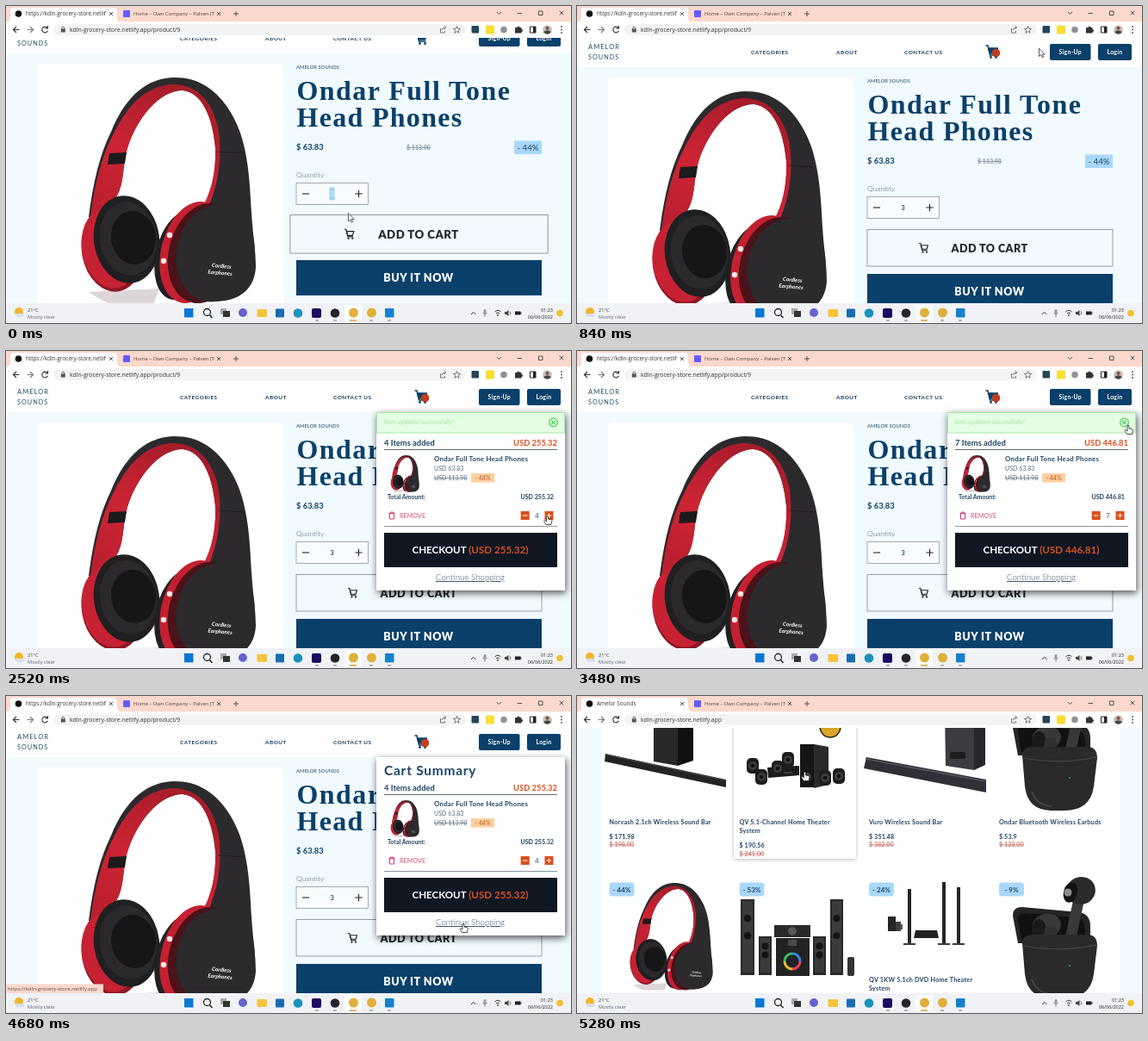
These frames come from a looping animation (656 by 368 pixels, 5.4 s). An HTML page:

```html
<!DOCTYPE html>
<html lang="en">
<head>
<meta charset="utf-8">
<title>Shop demo</title>
<style>
html,body{margin:0;width:100%;height:100%;overflow:hidden;background:#fff}
svg{display:block;width:100vw;height:100vh}
text{font-family:Lato,sans-serif;white-space:pre}
.ui text{font-family:"Open Sans","Noto Sans",sans-serif}
.serif{font-family:"Liberation Serif",serif;font-weight:700}
.shadow{filter:drop-shadow(1px 3px 4px #000a)}
.soft{filter:drop-shadow(0 1px 2px #0004)}
</style>
</head>
<body>
<svg id="stage" viewBox="0 0 656 368" preserveAspectRatio="none"></svg>
<script>
const STEP = 120, LOOP = 5400, UNIT = 63.83;
const NAVY = '#0a406a', INK = '#1f4566', PALE = '#f1faff', ORANGE = '#d9501e';

const text = (x, y, s, size, fill = INK, more = '') =>
  `<text x="${x}" y="${y}" font-size="${size}" fill="${fill}" ${more}>${s}</text>`;
const rect = (x, y, w, h, fill, more = '') =>
  `<rect x="${x}" y="${y}" width="${w}" height="${h}" fill="${fill}" ${more}/>`;
const circle = (x, y, r, fill, more = '') =>
  `<circle cx="${x}" cy="${y}" r="${r}" fill="${fill}" ${more}/>`;
const oval = (x, y, rx, ry, fill, turn = 0) =>
  `<ellipse cx="${x}" cy="${y}" rx="${rx}" ry="${ry}" fill="${fill}" transform="rotate(${turn} ${x} ${y})"/>`;
const shape = (d, fill, more = '') => `<path d="${d}" fill="${fill}" ${more}/>`;
const line = (d, color = '#444', w = 1) =>
  `<path d="${d}" fill="none" stroke="${color}" stroke-width="${w}"/>`;
const group = (id, body) => `<g id="${id}">${body}</g>`;
const bold = 'font-weight="700" ', heavy = 'font-weight="900" ', light = 'font-weight="300" ';
const middle = 'text-anchor="middle" ', right = 'text-anchor="end" ';
const spaced = n => `letter-spacing="${n}" `;
const strike = 'text-decoration="line-through"';
const cross = (x, y, r) => `M${x - r} ${y - r}l${2 * r} ${2 * r}m0 ${-2 * r}l${-2 * r} ${2 * r}`;
const plus = (x, y, r) => `M${x - r} ${y}h${2 * r}M${x} ${y - r}v${2 * r}`;
const trolley = (x, y, s, color, fill) =>
  `<g transform="translate(${x} ${y}) scale(${s})">` +
  shape('M3 3H14L12 9H5Z', fill, `stroke="${color}" stroke-width="1.5" stroke-linejoin="round"`) +
  line('M0 0H2.5L5 11H13', color, 1.5) + circle(6, 13.5, 1.4, color) + circle(12, 13.5, 1.4, color) + '</g>';

const headphones = () =>
  shape('M95 332L178 328L172 345H118Z', '#ddd6d8') +
  // band: dark shell, then the red lining along its inside
  shape('M96 245C101 205 109 172 122 146C140 102 166 83 196 83C230 83 252 104 267 135C281 165 283 202 285 240C287 270 290 284 290 303C289 325 275 342 245 343L214 330L230 232C240 212 244 188 243 164C240 130 228 100 205 98C178 98 152 130 141 165C135 185 138 205 128 222L118 245Z', '#2c2a2d') +
  shape('M98 245C103 205 112 172 126 146C144 110 166 93 192 91C222 90 241 112 247 145C251 175 247 206 235 233L229 232C240 211 244 188 243 164C240 130 228 100 205 98C178 98 152 130 141 165C135 185 138 205 128 222L118 245Z', 'url(#lining)') +
  shape('M120 171L140 170L138 183L118 184Z', '#1c1a1c') + line('M246 169L276 171', '#19181a', .8) +
  oval(123, 284, 35, 48, '#8d1824', -10) + oval(121, 281, 33, 47, '#c62233', -10) +
  oval(140, 271, 38, 51, '#201f21', -8) + oval(142, 270, 33, 43, '#2b292b', -8) +
  oval(148, 269, 26, 31, '#161517', -8) +
  oval(204, 289, 30, 53, '#202022', 14) + oval(217, 286, 37, 60, '#c42030', 14) +
  oval(230, 287, 41, 59, '#4a1219', 14) + oval(243, 287, 45, 57, '#2c2a2d', 12) +
  circle(190, 266, 3.2, '#f0e6e6') + circle(183, 296, 3.2, '#f0e6e6') +
  `<g transform="rotate(5 250 305)" font-style="italic" ${bold}${middle}>` +
  text(250, 304, 'Cordless', 6.4, '#fff') + text(249, 312, 'Earphones', 6.4, '#fff') + '</g>';

const earbuds = () =>
  shape('M506 172Q506 162 517 162L583 168Q596 170 596 184V204H512Z', '#252527') +
  shape('M512 176Q512 169 520 169L580 174Q589 176 590 188V200H516Z', '#111113') +
  shape('M577 150L589 154L580 196H567Z', '#39393c') +
  oval(585, 143, 17, 16, '#2b2b2e', -20) + oval(573, 145, 8, 12, '#141416', 15) +
  circle(570, 145, 4.5, '#8b8b8e') +
  oval(545, 184, 17, 14, '#38383b', -15) + oval(536, 187, 8, 11, '#1a1a1c', 10) +
  rect(543, 184, 14, 20, '#303033', 'rx="4"') +
  shape('M517 204Q517 194 530 194H592Q604 194 604 207L600 240Q596 268 566 268H550Q523 267 520 240Z', '#2a2a2c') +
  line('M519 207Q560 215 603 206', '#48484b', 1.2) + line('M528 246Q534 262 551 263', '#454548', 2) +
  circle(572, 230, 1.1, '#3f9f68');

const barOne = () =>
  shape('M89 157L117 154V216L89 211Z', '#29292b') + shape('M117 154L135 157V210L117 216Z', '#111') +
  shape('M33 202L173 232L173 241L32 211Z', '#232326') + line('M34 203L172 233', '#4b4b50', 1);
const barTwo = () =>
  shape('M427 153L461 149V221L428 216Z', '#3c3c42') + shape('M461 149L474 152V215L461 221Z', '#26262a') +
  rect(433, 200, 18, 8, '#1d1d20', 'rx="2"') +
  shape('M336 206L475 232V247L333 219Z', '#303039') + line('M335 208L474 234', '#555560', 1.4);
const speaker = (x, y) =>
  rect(x - 7, y - 9, 14, 18, '#1d1d1f', 'rx="5"') + circle(x, y, 5, '#3d3d40') + circle(x, y, 2.3, '#111');
const theater = () =>
  rect(259, 191, 16, 50, '#161617') + shape('M275 191L292 194V238L275 242Z', '#2b2b2d') + circle(267, 229, 5, '#424245') +
  shape('M221 218L258 216V227L222 230Z', '#1c1c1e') + line('M226 224H250', '#63636a', 1) +
  [[204, 216], [214, 229], [233, 219], [245, 209], [288, 230], [304, 228]].map(p => speaker(...p)).join('') +
  circle(294, 171, 12, '#d9a52c', 'stroke="#2a2414" stroke-width="1.5"');
const tower = (x, y, w, h) =>
  rect(x, y, w, h, '#29292b') + rect(x + 2, y + 2, w - 4, h - 5, '#3b3b3e') +
  [.25, .48].map(k => circle(x + w / 2, y + h * k, w * .27, '#141415')).join('');
const towers = () =>
  tower(190, 371, 16, 88) + tower(294, 371, 15, 88) + tower(211, 414, 15, 45) + tower(274, 414, 15, 45) +
  rect(229, 401, 42, 14, '#29292b') + circle(250, 408, 5, '#55555a') +
  rect(231, 416, 39, 44, '#232325') + rect(245, 418, 10, 7, '#48484d') +
  ['#e83c5b', '#e7bd2b', '#34bd69', '#3784dc'].map((c, i) =>
    circle(250, 443, 9, 'none', `stroke="${c}" stroke-width="3" stroke-dasharray="14.2 42.4" transform="rotate(${i * 90} 250 443)"`)).join('') +
  rect(314, 438, 8, 22, '#333336', 'rx="2"');
const dvd = () =>
  [[384, 359, 64], [424, 351, 72], [441, 357, 66]].map(([x, y, h]) =>
    rect(x, y, 4, h, '#252528') + rect(x - 5, y + h - 1, 14, 2, '#3b3b3e')).join('') +
  rect(361, 391, 9, 17, '#252528') + rect(370, 397, 6, 11, '#3d3d40') +
  shape('M393 407H418L420 416H391Z', '#222225') + rect(375, 400, 3, 6, '#555');

const badge = (x, y, s) => rect(x, y, 29, 16, '#a9d8fb', 'rx="4"') + text(x + 14.5, y + 11, s, 8, INK, bold + middle);
const card = (x, y, off, names, now, old, shift = 0) => {
  const top = y + 150 + shift, last = top + (names.length - 1) * 10.3;
  return badge(x, y, off) +
    names.map((n, i) => text(x, top + i * 10.3, n, 7.2, INK, bold + spaced(.25))).join('') +
    text(x, last + 17, now, 7.2, INK, bold + spaced(.1)) +
    text(x, last + 26.7, old, 7.2, '#c65b4d', strike);
};

const home = () =>
  rect(0, 37, 656, 460, PALE) +
  text(35, 44, 'who make Amelor Sounds the best place to buy your favourite audio equipment.', 9.4, INK, spaced(.15)) +
  text(9, 81, `BRINGING YOU THE <tspan fill="${ORANGE}">BEST</tspan> AUDIO GEAR`, 14.3, NAVY, heavy + spaced(2.1)) +
  line('M283 96.5H375', '#4c7190') + rect(28, 110, 602, 500, '#fff', 'rx="3"') +
  rect(0, 128, 142, 196, '#fff', 'id="lift" class="soft" rx="2"') +
  barOne() + theater() + barTwo() + group('buds', earbuds()) + '<use href="#buds" y="218"/>' +
  '<use href="#phones" transform="translate(20 312.5) scale(.475)"/>' + towers() + dvd() +
  card(37.5, 133.5, '- 13%', ['Norvash 2.1ch Wireless Sound Bar'], '$ 171.98', '$ 198.00') +
  card(188.5, 133.5, '- 21%', ['QV 5.1-Channel Home Theater', 'System'], '$ 190.56', '$ 241.00') +
  card(339, 133.5, '- 8%', ['Vuro Wireless Sound Bar'], '$ 351.48', '$ 382.00') +
  card(490, 133.5, '- 58%', ['Ondar Bluetooth Wireless Earbuds'], '$ 53.9', '$ 128.00') +
  badge(37.5, 351.5, '- 44%') + badge(188.5, 351.5, '- 53%') + badge(490, 351.5, '- 9%') +
  card(339, 351.5, '- 24%', ['QV 1KW 5.1ch DVD Home Theater', 'System'], '$ 322.85', '', -34.5);

const button = (x, w, s) =>
  rect(x, 44, w, 19, NAVY, 'rx="2"') + text(x + w / 2, 56, s, 6.9, '#fff', bold + middle + spaced(.3));
const product = () =>
  rect(0, 37, 656, 350, PALE) + rect(0, 37, 656, 34, '#fefefe') +
  text(13, 49.5, 'AMELOR', 7.6, '#1c5268', spaced(1)) + text(13, 61.7, 'SOUNDS', 7.3, '#1c5268', spaced(1)) +
  [[202, 'CATEGORIES'], [301, 'ABOUT'], [380, 'CONTACT US']].map(([x, s]) =>
    text(x, 56, s, 6.4, '#173d5e', bold + spaced(.5))).join('') +
  trolley(474.5, 46, 1, NAVY, NAVY) + circle(486.5, 54.5, 4.8, '#bd3d20', 'id="dot"') +
  button(549, 47.5, 'Sign-Up') + button(605, 39, 'Login') +
  rect(36, 83, 286, 300, '#fff', 'rx="5"') + '<use href="#phones" y="16"/>' +
  text(337, 88.5, 'AMELOR SOUNDS', 5.8, INK, spaced(.05)) +
  text(337.5, 124.5, 'Ondar Full Tone', 32, NAVY, 'class="serif" ' + spaced(1.45)) +
  text(337.5, 155.5, 'Head Phones', 32, NAVY, 'class="serif" ' + spaced(1.3)) +
  text(337, 183.3, '$ 63.83', 9.4, NAVY, bold) + text(465, 182.6, '$ 113.98', 7, '#647789', strike) +
  rect(590, 172.5, 32, 15.5, '#a9d8fb') + text(606, 183.6, '- 44%', 9.6, INK, middle) +
  text(337, 215.4, 'Quantity', 8.5, '#47596a', light) +
  rect(337, 221.5, 83.5, 25, '#f8fcff', 'stroke="#8d979e" stroke-width=".8"') +
  line('M344 234H352', '#222', 1.1) + line(plus(409.5, 234, 4.2), '#222', 1.1) +
  rect(375.5, 226.5, 6, 15, '#9ed2f5', 'id="mark"') + text(378.7, 236.8, '3', 7.3, INK, 'id="qty" ' + bold + middle) +
  group('add', rect(337, 259.5, 285, 42.5, PALE, 'stroke="#7d878e" stroke-width=".8"') + trolley(397, 275.5, .75, '#222', 'none') +
    text(434.5, 285.6, 'ADD TO CART', 12.6, '#222a31', heavy + spaced(.45))) +
  rect(337, 311, 285, 41, NAVY) + text(479, 335.7, 'BUY IT NOW', 12.6, '#fff', heavy + middle + spaced(.55));

const cart = () =>
  rect(430, 71, 219, 207, '#fff', 'class="shadow"') +
  text(439, 92, 'Cart Summary', 15.4, INK, bold + spaced(.8)) +
  group('note', rect(430.5, 71.5, 218, 23.5, '#e4ffe3', 'stroke="#a5eaa2"') +
    text(439, 85.4, 'Item updated successfully!', 7, '#a5e29f') +
    circle(635.5, 83, 4.8, 'none', 'stroke="#45cf4b" stroke-width="1.2"') + line(cross(635.5, 83, 2.2), '#45cf4b', 1.2)) +
  text(439, 110.2, '<tspan class="count"></tspan> Items added', 9.4, INK, bold) +
  text(640, 110.2, '', 9.4, ORANGE, 'class="sum" ' + bold + right) + line('M439 114.5H640', '#5d6a75') +
  '<use href="#phones" transform="translate(432.5 107.5) scale(.163)"/>' +
  text(497, 128.2, 'Ondar Full Tone Head Phones', 7.8, INK, bold + spaced(.25)) +
  text(497, 139, 'USD 63.83', 7.1, '#566b7d') + text(497, 149.7, 'USD 113.98', 7.1, '#566b7d', strike) +
  rect(540, 142, 27, 10.5, '#ffcf9f') + text(553.5, 149.8, '- 44%', 7.2, '#b75b22', middle) +
  text(443, 172.4, 'Total Amount:', 7, INK, bold) + text(636, 172.4, '', 7.1, INK, 'class="sum" ' + bold + right) +
  line('M444.5 188.5H451.5M446.5 188V187H449.5V188M445.5 189V195H450.5V189', '#d33a6d', 1) +
  text(457, 193.7, 'REMOVE', 7, '#d34a78', spaced(.15)) +
  [602.7, 630.5].map(x => rect(x - 5, 186, 10, 10, ORANGE)).join('') +
  line('M600 191H605.4', '#fff') + line(plus(630.5, 191, 2.7), '#fff') +
  text(616.5, 194, '', 7.6, INK, 'class="count" ' + middle) + line('M439 203.5H640', '#8b949c') +
  rect(439, 211, 201, 40, '#0f1723') +
  text(539, 235, `CHECKOUT <tspan fill="${ORANGE}">(<tspan class="sum"></tspan>)</tspan>`, 11.6, '#fff', bold + middle) +
  text(539, 266, 'Continue Shopping', 9.7, '#36546e', light + middle + 'text-decoration="underline"');

const chrome = () =>
  rect(0, 0, 656, 18, '#fbd8cd') + shape('M2 18Q5 17 5 13V5Q5 2 9 2H125Q129 2 129 6V13Q129 18 133 18Z', '#fff') +
  rect(0, 18, 656, 19, '#fff') + rect(55, 21, 479, 13, '#f1f3f4', 'rx="6.5"') +
  circle(14.5, 9, 3.8, '#111') + text(23, 11.3, '', 6.4, '#333', 'id="tab"') + line(cross(122, 9, 2), '#444', .9) +
  rect(136, 5, 8, 8, '#635bff', 'rx="1"') + text(148, 11.3, 'Home – Own Company – Palven [T', 5.9, '#4b4040') +
  line(cross(247, 9, 2), '#444', .9) + line(plus(267, 9, 3), '#444', .9) +
  line('M570 7L572.5 9.5L575 7M593.5 8.5H599M618.5 6H623V10.5H618.5Z', '#444', .9) + line(cross(645, 8, 2.3), '#444', .9) +
  line('M15.5 27.5H8.5M12 24L8.5 27.5L12 31', '#333', 1.2) + line('M24.5 27.5H31.5M28 24L31.5 27.5L28 31', '#777', 1.2) +
  line('M48 25.5A3.4 3.4 0 1 0 48.4 28.8M48.5 23V26H45.5', '#333', 1.1) +
  rect(63.8, 26.5, 5, 4, '#555') + line('M65 27V25.4A1.3 1.3 0 0 1 67.6 25.4V27', '#555', .9) +
  text(74, 30, '', 6.9, '#333', 'id="address"') +
  line('M504.5 26V31H509.5V29M506 28Q506.5 25 510.5 25M508.5 23L510.7 25L508.5 27', '#666', .9) +
  line('M523.5 23.5L524.6 26.2L527.6 26.4L525.3 28.3L526 31.2L523.5 29.6L521 31.2L521.7 28.3L519.4 26.4L522.4 26.2Z', '#555', .8) +
  rect(540.5, 23, 8.5, 8.5, '#22475d', 'rx="1"') + rect(557, 22.5, 10, 10, '#f8de35', 'rx="1"') + circle(578, 27.5, 3.8, '#8d9396') +
  shape('M591 25H593.5A1.5 1.5 0 0 1 596.5 25H598.5V27A1.5 1.5 0 0 1 598.5 30V31.5H591Z', '#333') +
  line('M608.5 24H615V31H608.5Z', '#222', 1) + rect(612, 24, 3, 7, '#222') +
  circle(628.5, 27.5, 5.3, '#cbbcaf') + shape('M624 30.3Q628.5 26 633 30.3Q628.5 35 624 30.3Z', '#444') + circle(628.5, 25.8, 2, '#6f5548') +
  [24, 27.5, 31].map(y => circle(645, y, .9, '#444')).join('');

const taskbar = () =>
  rect(0, 345, 656, 23, '#f0f2f6') + circle(15, 355, 5, '#f5b52c') + rect(11, 357, 10, 4, '#d7e0ea', 'rx="2"') +
  text(25, 354.5, '21°C', 5.7, '#333') + text(25, 363, 'Mostly clear', 5.7, '#5c6470') +
  rect(207, 351, 10.5, 10.5, '#0878d4') + line('M236.5 358.8L239.5 362', '#222', 1.5) +
  circle(233.5, 355.5, 4, 'none', 'stroke="#222" stroke-width="1.3"') +
  rect(249, 351, 7, 7, '#aaa') + rect(252, 354, 8, 7, '#333') + circle(275, 356, 5, '#6563ce') +
  rect(291.5, 352, 11.5, 9, '#f6c33a', 'rx="1"') + rect(313, 351.5, 10, 10, '#186db0', 'rx="1"') + circle(339, 356.5, 5.3, '#1b91bd') +
  rect(355, 351, 11, 11, '#1b0c61', 'rx="2"') + circle(382, 356.5, 5.3, '#26232c') + rect(393, 347, 20, 19, '#f9fbfe', 'rx="2"') +
  circle(403.5, 356, 5.5, '#dfb03a') + circle(424.5, 356, 5.5, '#dfb03a') + rect(440, 351, 10.5, 10.5, '#1681cb', 'rx="1"') +
  [361, 382, 424, 445].map(x => line(`M${x - 2} 365H${x + 2}`, '#8c929a', 1.2)).join('') + line('M399 365H407', '#d79a24', 1.4) +
  line('M540 358L542.7 355.3L545.4 358', '#333', 1) + rect(554.5, 352, 3, 5.5, '#999', 'rx="1.5"') +
  line('M553.5 356Q556 360.5 558.5 356M556 358.5V361', '#777', .8) +
  line('M567.5 355Q571 351.5 574.5 355M569 357Q571 355 573 357', '#333', 1) + circle(571, 359, .9, '#333') +
  shape('M579 355H581L583.5 353V360L581 358H579Z', '#444') + line('M585 354.5Q586.5 356.5 585 358.5', '#444', .8) +
  rect(591, 354.5, 6.5, 4, '#222') + rect(597.5, 355.5, 1, 2, '#222') +
  text(635, 354.5, '01:23', 5.5, '#222', right) + text(635, 362.5, '06/06/2022', 5.5, '#222', right) + circle(643, 356.5, 3.8, '#f1c02e');

const stage = document.getElementById('stage');
stage.innerHTML =
  `<defs><clipPath id="view">${rect(0, 37, 656, 308, '#000')}</clipPath>` +
  '<linearGradient id="lining" x1="0" y1="1" x2=".6" y2="0"><stop offset="0" stop-color="#b81f2e"/>' +
  '<stop offset=".5" stop-color="#cc2435"/><stop offset="1" stop-color="#a81c2b"/></linearGradient>' +
  `${group('phones', headphones())}</defs>` +
  `<g clip-path="url(#view)">${group('shop', product())}${group('home', home())}${group('cart', cart())}</g>` +
  `<g class="ui">${chrome()}${taskbar()}` +
  group('status', rect(0, 334.5, 113, 10.5, '#fbd8cd') + text(2, 341.8, 'https://kdln-grocery-store.netlify.app', 6.1, '#5d4843')) + '</g>' +
  group('arrow', shape('M0 0V9.5L2.2 7.5L3.7 10.8L5.2 10.1L3.7 7H6.6Z', '#fff', 'stroke="#222" stroke-width=".7"')) +
  group('hand', shape('M-1 1Q0 -1 1 1V4L4.7 4.8Q5.6 5.2 5.3 6.5L4.5 10.5H-1.5L-4 6.5Q-3.6 5 -2.2 6L-1 7Z', '#fff', 'stroke="#222" stroke-width=".8"'));

const $ = id => document.getElementById(id);
const show = (id, on) => { $(id).style.display = on ? '' : 'none'; };
const fill = (cls, s) => stage.querySelectorAll('.' + cls).forEach(e => { e.textContent = s; });
const move = (id, x, y) => $(id).setAttribute('transform', `translate(${x} ${y})`);

// step, x, y, pointing hand
const trail = [
  [0, 397.5, 240.5, 0], [2, 440, 262, 1], [3, 452, 262, 1], [4, 480, 200, 0], [7, 536.5, 49, 0], [9, 484, 54, 1], [10, 482, 54, 1],
  [12, 520, 100, 0], [17, 628.5, 191, 1], [25, 628.5, 191, 1], [27, 634, 130, 0], [29, 640, 86, 1], [30, 638, 86, 1], [31, 625, 130, 0],
  [33, 602, 191, 1], [36, 602, 191, 1], [37, 635, 84, 1], [38, 635, 84, 1], [39, 531, 264, 1], [40, 531, 264, 1],
  [41, 411.5, 217, 1], [43, 295, 110, 1], [44, 264.5, 88, 1]];
// step, items in the cart
const counts = [[0, 3], [20, 4], [23, 5], [24, 6], [26, 7], [34, 6], [35, 5], [36, 4]];
const latest = (list, n) => list.filter(k => k[0] <= n).pop();

function draw(ms) {
  const n = Math.floor((ms % LOOP) / STEP);
  const atHome = n >= 40;
  show('shop', !atHome);
  show('home', atHome);
  show('cart', n >= 11 && !atHome);
  show('note', (n >= 21 && n < 30) || (n >= 34 && n < 38));
  show('status', n === 39);
  show('dot', n >= 3);
  show('mark', n < 3);
  $('qty').setAttribute('fill', n < 3 ? '#e9f7ff' : INK);
  $('add').setAttribute('transform', n < 4 ? 'translate(479.5 281) scale(1.05) translate(-479.5 -281)' : '');
  move('shop', 0, n < 4 ? -16 : n < 5 ? -8 : 0);
  move('home', 0, n < 42 ? 0 : [-20, -85, -135][n - 42]);
  $('lift').setAttribute('x', n < 43 ? 333 : 182);

  const items = latest(counts, n)[1];
  fill('count', items);
  fill('sum', 'USD ' + (items * UNIT).toFixed(2));
  $('tab').textContent = atHome ? 'Amelor Sounds' : 'https://kdln-grocery-store.netlif';
  $('address').textContent = 'kdln-grocery-store.netlify.app' + (atHome ? '' : '/product/9');

  const a = latest(trail, n), b = trail.find(k => k[0] > n) || a;
  const p = b === a ? 0 : (n - a[0]) / (b[0] - a[0]);
  const x = a[1] + (b[1] - a[1]) * p, y = a[2] + (b[2] - a[2]) * p;
  show('hand', a[3]);
  show('arrow', !a[3]);
  move('hand', x, y);
  move('arrow', x, y);
}

const start = performance.now();
function tick() {
  draw(performance.now() - start);
  requestAnimationFrame(tick);
}
tick();
</script>
</body>
</html>
```
